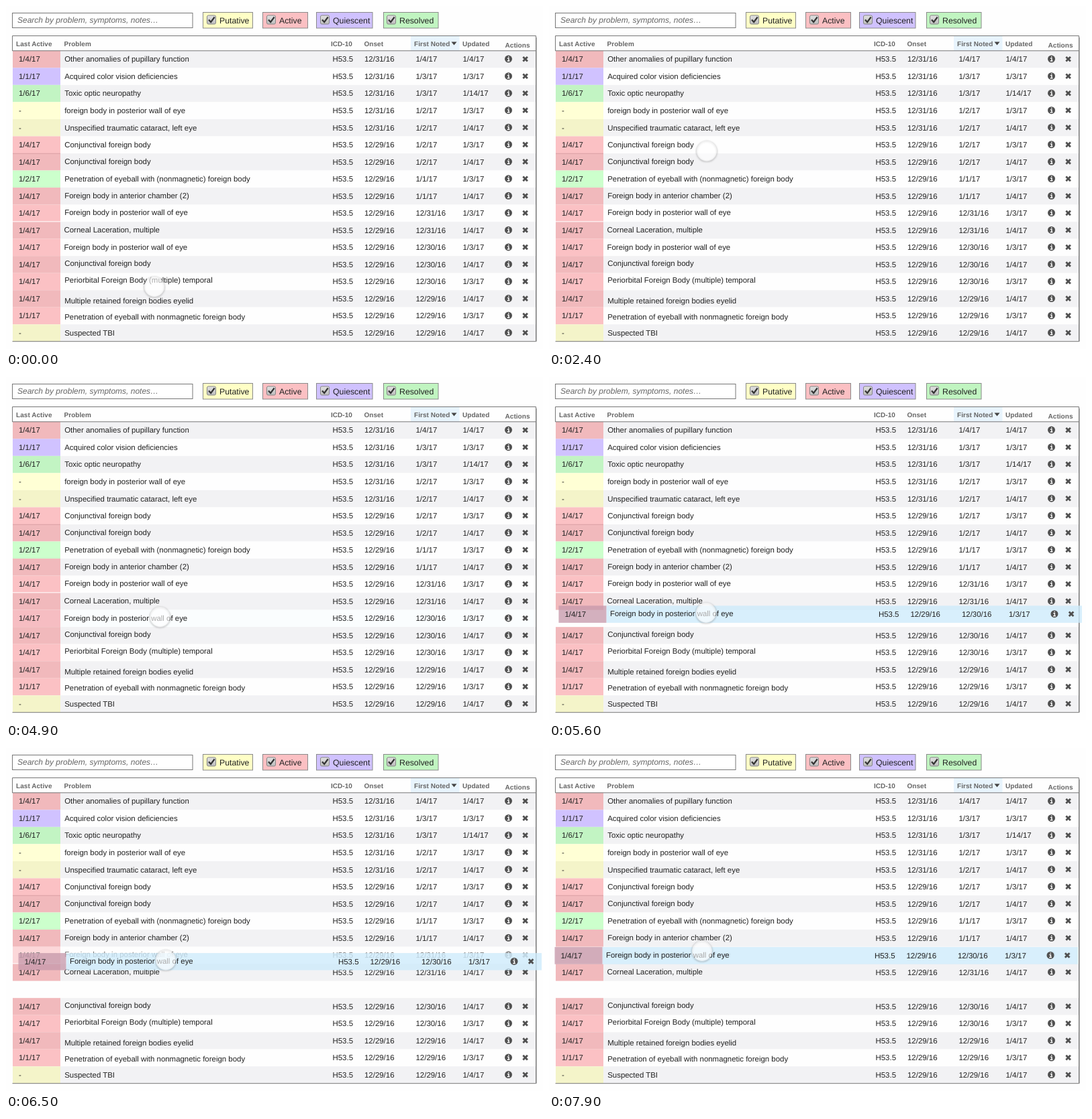
Animation, 800 px wide and 512 px high, one loop 8 s. Source, as an HTML page:

```html
<!DOCTYPE html>
<html lang="en">
<head>
<meta charset="utf-8">
<title>Problem list</title>
<style>
  html, body { margin: 0; width: 100%; height: 100%; overflow: hidden; background: #fefefe; }
  svg {
    display: block; fill: #222; text-rendering: geometricPrecision;
    font: 11.45px "Liberation Sans", Arial, sans-serif;
  }
</style>
</head>
<body>
<svg id="stage" width="800" height="512" viewBox="0 0 800 512">
  <defs>
    <linearGradient id="box" x2="0" y2="1">
      <stop stop-color="#e2e2e2"/><stop offset="1" stop-color="#bdbdbd"/>
    </linearGradient>
    <filter id="shadow" x="-30%" y="-30%" width="160%" height="160%">
      <feGaussianBlur stdDeviation="1"/>
    </filter>
  </defs>
  <g id="page"></g>
  <g id="drag"></g>
  <g id="cursor">
    <circle r="15" cy=".8" fill="none" stroke="#666" stroke-opacity=".42" stroke-width="1.6" filter="url(#shadow)"/>
    <circle r="15" fill="#fff" fill-opacity=".62"/>
  </g>
</svg>
<script>
const TOP = 66.8, PITCH = 25.53, HELD = 11, UNDER = 9, LOOP = 8000;
const $ = id => document.getElementById(id);
const text = (x, y, s, attrs = '') => `<text x="${x}" y="${y}" ${attrs}>${s}</text>`;
const rect = (x, y, w, h, fill, attrs = '') =>
  `<rect x="${x}" y="${y}" width="${w}" height="${h}" fill="${fill}" ${attrs}/>`;

// status colours: [on white rows, on grey rows]
const tints = {
  A: ['#fbc1c4', '#f1b9bc'],
  Q: ['#d0c2ff', '#c7b9f4'],
  R: ['#ccffcc', '#c2f4c3'],
  P: ['#ffffd5', '#f4f4c9']
};

// status, last active, problem, onset, first noted, updated, text shift
const rows = `A|1/4/17|Other anomalies of pupillary function|12/31/16|1/4/17|1/4/17|0
Q|1/1/17|Acquired color vision deficiencies|12/31/16|1/3/17|1/3/17|0
R|1/6/17|Toxic optic neuropathy|12/31/16|1/3/17|1/14/17|-.5
P|-|foreign body in posterior wall of eye|12/31/16|1/2/17|1/3/17|0
P|-|Unspecified traumatic cataract, left eye|12/31/16|1/2/17|1/4/17|0
A|1/4/17|Conjunctival foreign body|12/29/16|1/2/17|1/3/17|-.5
A|1/4/17|Conjunctival foreign body|12/29/16|1/2/17|1/4/17|-.8
R|1/2/17|Penetration of eyeball with (nonmagnetic) foreign body|12/29/16|1/1/17|1/3/17|0
A|1/4/17|Foreign body in anterior chamber (2)|12/29/16|1/1/17|1/4/17|-.5
A|1/4/17|Foreign body in posterior wall of eye|12/29/16|12/31/16|1/3/17|-1
A|1/4/17|Corneal Laceration, multiple|12/29/16|12/31/16|1/4/17|-.5
A|1/4/17|Foreign body in posterior wall of eye|12/29/16|12/30/16|1/3/17|-.7
A|1/4/17|Conjunctival foreign body|12/29/16|12/30/16|1/4/17|-1.3
A|1/4/17|Periorbital Foreign Body (multiple) temporal|12/29/16|12/30/16|1/3/17|-2
A|1/4/17|Multiple retained foreign bodies eyelid|12/29/16|12/29/16|1/4/17|3
A|1/1/17|Penetration of eyeball with nonmagnetic foreign body|12/29/16|12/29/16|1/3/17|2
P|-|Suspected TBI|12/29/16|12/29/16|1/4/17|.5`.split('\n').map(r => r.split('|'));

function drawRow(i, held) {
  const [status, last, problem, onset, noted, updated, shift] = rows[i];
  const y = TOP + i * PITCH, mid = y + 12.6, base = mid + 4, grey = i % 2 ? 0 : 1;
  const alpha = held ? 'opacity=".78"' : '';
  return rect(81, y, 708.5, PITCH, held ? '#cdebfb' : grey ? '#f2f2f4' : '#fefefe', alpha)
    + rect(10, y, 71, PITCH, held ? '#c79aac' : tints[status][grey], alpha)
    + text(19, base, last)
    + text(i == 10 || i == 11 ? 86.5 : 87.2, base + +shift, problem)
    + text(486.5, base, 'H53.5') + text(534, base, onset)
    + text(610.5, base, noted) + text(680.5, base, updated)
    + `<g transform="translate(748.5 ${mid - .3})"><circle r="5.5" fill="#505050"/>
       <path d="M-1.6-.8H.4V2.8M-1.8 3H1.9M-.5-3.2H.9" stroke="#fff" stroke-width="1.5"/>
       <path d="M21.8-3.2l6.6 6.6m0-6.6l-6.6 6.6" stroke="#505050" stroke-width="2.8"/></g>`;
}

function drawFilter(x, w, fill, boxX, label) {
  return rect(x + .5, 9.5, w, 23.5, fill, 'stroke="#8a8a8a"')
    + rect(boxX + .5, 14, 13, 13, 'url(#box)', 'rx="2" stroke="#858585"')
    + `<path d="M${boxX + 3} 20.5l3.2 3.5 5.5-7.5" fill="none" stroke="#333" stroke-width="2.2"/>`
    + text(boxX + 19, 25.5, label, 'font-size="12.3"');
}

const header = (x, y, s) =>
  text(x, y, s, 'font-size="10" font-weight="bold" fill="#666" letter-spacing=".05"');

$('page').innerHTML =
  rect(9.5, 10.5, 268.5, 22, '#fff', 'stroke="#777"')
  + text(17, 25.3, 'Search by problem, symptoms, notes…', 'font-size="12" font-style="italic" fill="#666"')
  + drawFilter(293, 74, '#ffffc6', 299, 'Putative')
  + drawFilter(382, 67, '#fbc0c3', 388, 'Active')
  + drawFilter(462, 83.5, '#d0c2ff', 468, 'Quiescent')
  + drawFilter(562, 81.5, '#c1f5c1', 567, 'Resolved')
  + rect(603, 45, 72.5, 22, '#e8f4fd')
  + header(15, 60, 'Last Active') + header(86.5, 60, 'Problem') + header(484, 60, 'ICD-10')
  + header(533.5, 60, 'Onset') + header(608, 60, 'First Noted')
  + '<path d="M663.5 53.5h8l-4 5z" fill="#444"/>'
  + header(680, 60, 'Updated') + header(743.5, 62, 'Actions')
  + rows.map((_, i) => `<g id="row${i}">${drawRow(i)}</g>`).join('')
  + '<path d="M10 220.2H81" stroke="#d9a0a4"/><path d="M10 321.8H81" stroke="#fff"/>'
  + '<path d="M9.5 67V44.5H789.5V500.7H9.5M9.5 66.8H789.5" fill="none" stroke="#777"/>'
  + '<path d="M790.3 47V501" stroke="#777" stroke-width=".6"/>';
$('drag').innerHTML = drawRow(HELD, true);

// pointer path: time, x, y
const path = [
  [0, 221, 419], [900, 224, 382], [1800, 230, 318], [2400, 235, 216.5], [2600, 235, 216.5],
  [3400, 231, 317], [3600, 230.5, 339], [4300, 229.5, 358], [5400, 229.5, 358],
  [5900, 242, 336], [6300, 240, 326], [6500, 238, 316.5], [7200, 228, 303], [8000, 228, 303]
];

const clamp = v => Math.min(1, Math.max(0, v));
const slope = (i, k) => path[i] && path[i + 1]
  ? (path[i + 1][k] - path[i][k]) / (path[i + 1][0] - path[i][0]) : 0;

// harmonic mean keeps the curve from overshooting
function tangent(i, k) {
  const a = slope(i - 1, k), b = slope(i, k);
  return a * b > 0 ? 2 * a * b / (a + b) : 0;
}

function at(t, k) {
  const i = path.findIndex((p, n) => t < path[n + 1][0]);
  const span = path[i + 1][0] - path[i][0], u = (t - path[i][0]) / span, v = 1 - u;
  return v * v * (1 + 2 * u) * path[i][k] + u * u * (3 - 2 * u) * path[i + 1][k]
    + span * u * v * (v * tangent(i, k) - u * tangent(i + 1, k));
}

const start = performance.now();
function draw(now) {
  const t = Math.max(0, now - start) % LOOP;
  const x = at(t, 1), y = at(t, 2), moving = t >= 5400;
  const dx = moving ? x - 229.5 : 0, dy = moving ? Math.max(-50.5, y - 358) : 0;
  $('cursor').setAttribute('transform', `translate(${x} ${y})`);
  $('drag').setAttribute('transform', `translate(${dx} ${dy})`);
  $('drag').setAttribute('opacity', clamp((t - 4840) / 500));
  $('row' + HELD).setAttribute('opacity', moving ? 0 : 1);
  $('row' + UNDER).setAttribute('opacity', 1 - .75 * clamp((t - 6250) / 500));
  requestAnimationFrame(draw);
}
draw(start);
</script>
</body>
</html>
```
